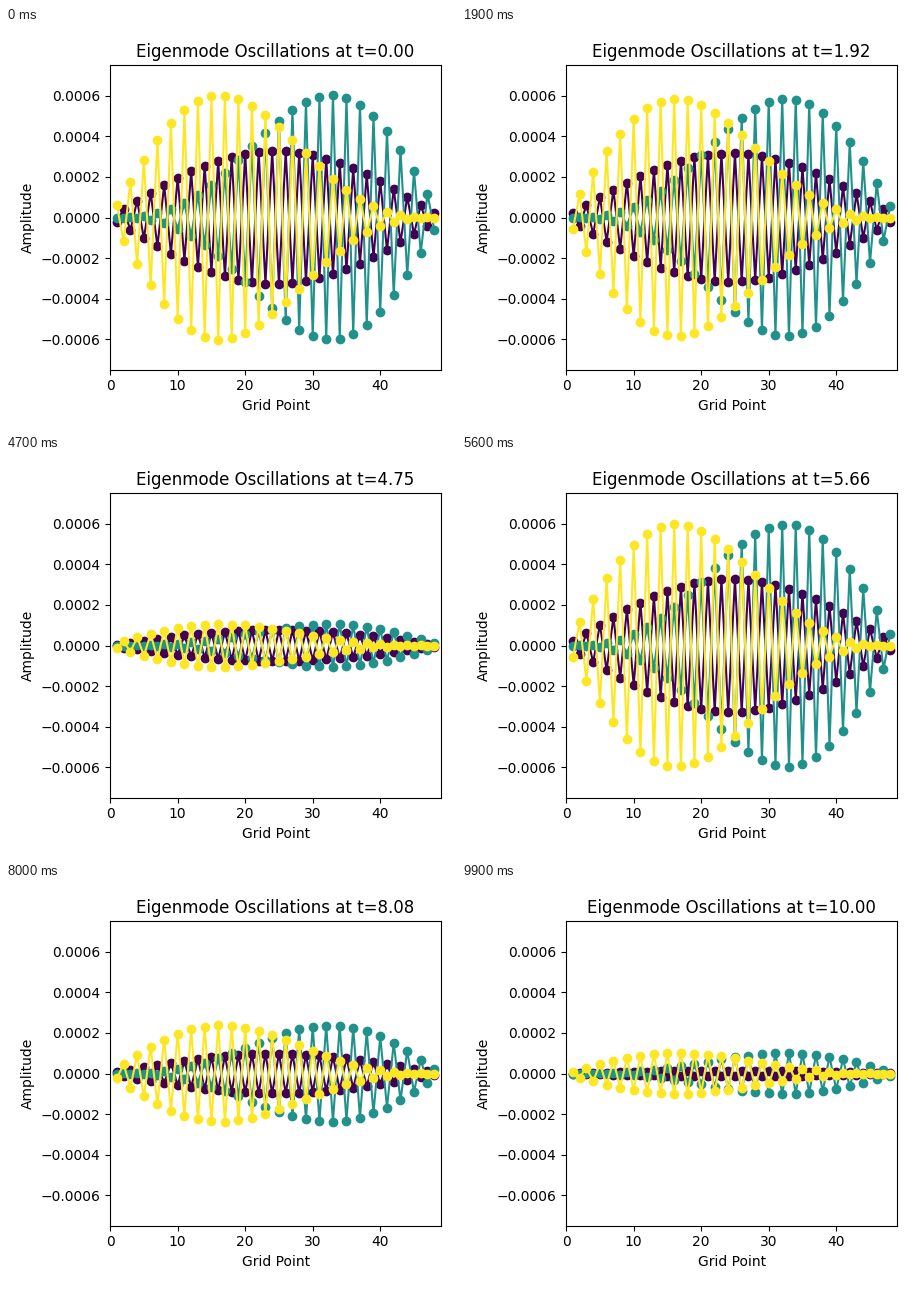
A matplotlib script for the animation above (10 s loop, 450 px wide and 400 px high).

```python
import numpy as np
import matplotlib.pyplot as plt
from matplotlib.animation import FuncAnimation

N = 50            # grid points per side
FRAMES = 100
SPACING = 0.98    # grid step
AMP = 3.275e-4

times = np.linspace(0, 10, FRAMES)
grid = np.arange(1, N - 1)
step = np.pi / (N - 1)


def laplace(k):
    """Discrete 1D Laplacian eigenvalue of the k-th mode from the top."""
    return (2 * np.cos(k * step / 2) / SPACING) ** 2


def envelope(k):
    return np.sin(k * step * grid)


sign = (-1.0) ** grid
single = AMP * sign * envelope(1)
left = -np.sqrt(2) * AMP * sign * (envelope(1) + envelope(2) / 2)
right = -np.sqrt(2) * AMP * sign * (envelope(1) - envelope(2) / 2)

# The two skewed shapes mix a degenerate pair and share one frequency.
low, high = laplace(1) + laplace(2), 2 * laplace(1)
modes = [(single, high), (right, low), (left, low)]

fig, ax = plt.subplots(figsize=(4.5, 4), dpi=100)
colors = plt.cm.viridis(np.linspace(0, 1, len(modes)))
lines = [ax.plot(grid, shape, "o-", color=c)[0]
         for (shape, _), c in zip(modes, colors)]

ax.set_xlim(0, N - 1)
ax.set_ylim(-7.5e-4, 7.5e-4)
ax.set_xlabel("Grid Point")
ax.set_ylabel("Amplitude")
title = ax.set_title("Eigenmode Oscillations at t=0.00")
fig.tight_layout()


def update(i):
    t = times[i]
    for line, (shape, freq) in zip(lines, modes):
        line.set_ydata(shape * np.cos(freq * t))
    title.set_text(f"Eigenmode Oscillations at t={t:.2f}")
    return [*lines, title]


anim = FuncAnimation(fig, update, frames=FRAMES, interval=100,
                     repeat=True, repeat_delay=0, blit=False)
plt.show()
```
